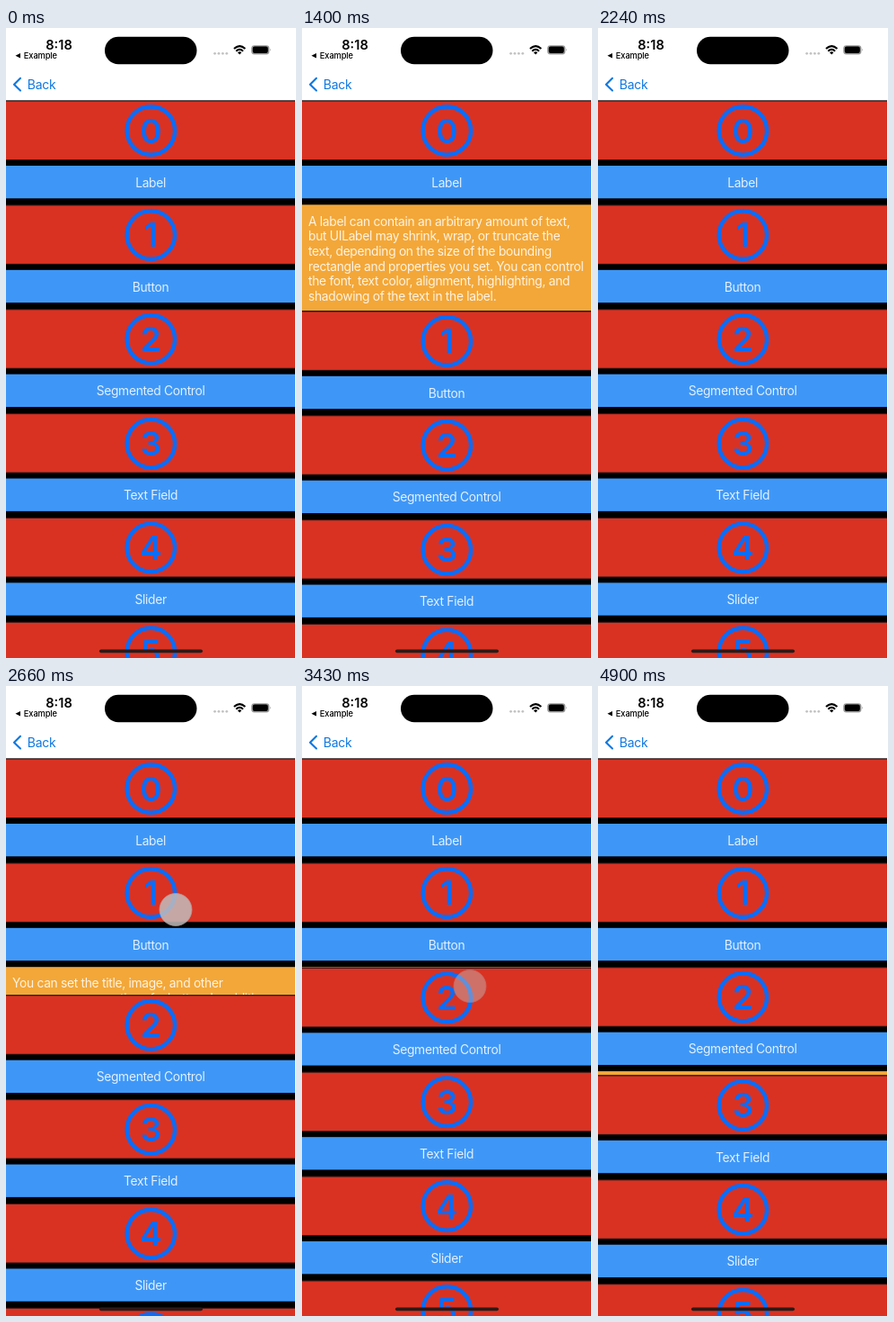
An HTML page that plays this animation: 323 px wide and 700 px high, repeating every 4960 ms.

```html
<!DOCTYPE html>
<html lang="en">
<head>
<meta charset="utf-8">
<title>Accordion list</title>
<style>
  html, body { margin: 0; width: 100%; height: 100%; overflow: hidden; background: #fff; }
  svg { display: block; width: 323px; height: 700px; }
  text { font-family: Inter, "Open Sans", sans-serif; font-size: 13.8px; letter-spacing: -0.3px; }
  .mid { text-anchor: middle; }
  .row { fill: #e4f0fe; }
  .note { fill: #fef3e2; }
  .digit { font-size: 37px; font-weight: 600; letter-spacing: 0; fill: #0b6cf8; }
</style>
</head>
<body>
<svg id="stage" viewBox="0 0 323 700" xmlns="http://www.w3.org/2000/svg">
  <rect width="322" height="700" fill="#000"/>
  <g id="list"></g>
  <circle id="touch" r="18" fill="#c2bcbc" stroke="#b5aaaa" stroke-width="0.8"/>
  <rect x="104" y="690.5" width="115" height="3.7" rx="1.85" fill="#2c1a18"/>

  <rect width="323" height="80.3" fill="#fff"/>
  <text class="mid" x="59" y="23.6" style="font-size:14.6px;font-weight:600;letter-spacing:0">8:18</text>
  <path d="M10.5 30.7 L16 28 V33.4 Z"/>
  <text x="19.8" y="34" style="font-size:9.3px;font-weight:500;letter-spacing:-0.1px">Example</text>
  <rect x="110" y="9.8" width="102.5" height="30.4" rx="15.2"/>
  <g id="dots" fill="#c2c2c2"></g>
  <g fill="none" stroke="#000" stroke-width="2.1">
    <path d="M254 23 Q260.2 17.3 266.4 23"/>
    <path d="M256.3 25.7 Q260.2 22.2 264.1 25.7"/>
  </g>
  <path d="M258 27.2 Q260.2 25.4 262.4 27.2 L260.2 29.5 Z"/>
  <rect x="273.2" y="19.2" width="20.2" height="10.2" rx="3.4" fill="#999"/>
  <rect x="274.8" y="20.6" width="17" height="7.4" rx="2.2"/>
  <path d="M294.2 22.8 Q296 24.3 294.2 25.8 Z" fill="#aaa"/>
  <path d="M16 55.8 L9 62.7 L16 69.6" fill="none" stroke="#0f78e2" stroke-width="2.1" stroke-linecap="round" stroke-linejoin="round"/>
  <text x="23.8" y="67.6" fill="#0f78e2" style="font-size:14px">Back</text>
</svg>
<script>
const LOOP = 4960, STEP = 70, SLIDE = 400;
const WIDTH = 322, TOP = 80.5, PITCH = 115.85, LINE = 16.67, PAD = 18;

const items = [
  { title: 'Label', open: 776, close: 1666, note: [
    'A label can contain an arbitrary amount of text,',
    'but UILabel may shrink, wrap, or truncate the',
    'text, depending on the size of the bounding',
    'rectangle and properties you set. You can control',
    'the font, text color, alignment, highlighting, and',
    'shadowing of the text in the label.'] },
  { title: 'Button', open: 2496, close: 3050, note: [
    'You can set the title, image, and other',
    'appearance properties of a button. In addition,',
    'you can specify a different appearance for each',
    'button state.'] },
  { title: 'Segmented Control', open: 3690, close: 4550, note: [
    'The segments can represent single or multiple',
    'selection, or a list of commands.',
    '',
    'Each segment can display text or an image, but',
    'not both.'] },
  { title: 'Text Field' },
  { title: 'Slider' },
  { title: 'Switch' }
];

const taps = [
  { from: 600, to: 1200, x: 183.5, y: 135.5 },
  { from: 1400, to: 2000, x: 183.5, y: 135.5 },
  { from: 2260, to: 2790, x: 189, y: 248.5 },
  { from: 2830, to: 3240, x: 189, y: 248.5 },
  { from: 3360, to: 3950, x: 187, y: 333.5 },
  { from: 4230, to: 4790, x: 187, y: 337 }
];

const byId = id => document.getElementById(id);
const list = byId('list'), touch = byId('touch');

function add(parent, tag, attrs, content) {
  const el = document.createElementNS('http://www.w3.org/2000/svg', tag);
  for (const k in attrs) el.setAttribute(k, attrs[k]);
  if (content) el.textContent = content;
  return parent.appendChild(el);
}

const bar = (g, y, height, fill) => add(g, 'rect', { y, width: WIDTH, height, fill });

// Each section is opaque, so it hides whatever part of the note above is folded.
items.forEach((item, i) => {
  const g = item.node = add(list, 'g', {});
  bar(g, 0, PITCH + 0.3, '#000');
  bar(g, 0, 66.4, '#351916');
  bar(g, 1.1, 64.4, '#d93223');
  bar(g, 72.5, 36.3, '#3e97f7');
  add(g, 'circle', { cx: 161.4, cy: 33.6, r: 26.7, fill: 'none', stroke: '#0b6cf8', 'stroke-width': 4.6 });
  add(g, 'text', { class: 'digit mid', x: 161.4, y: 47 }, String(i));
  add(g, 'text', { class: 'row mid', x: 161.1, y: 96.2 }, item.title);
  item.height = 0;
  if (!item.note) return;
  item.height = item.note.length * LINE + PAD;
  item.fold = add(g, 'g', { transform: `translate(0 ${PITCH})` });
  bar(item.fold, 0, item.height, '#f3a738');
  item.note.forEach((s, n) =>
    add(item.fold, 'text', { class: 'note', x: 7, y: 23.2 + n * LINE }, s));
});

for (let i = 0; i < 4; i++) add(byId('dots'), 'circle', { cx: 232.6 + i * 4.4, cy: 28.3, r: 1.4 });

const clamp = v => Math.min(1, Math.max(0, v));
const ease = v => v * v * (3 - 2 * v);
const slide = (t, start) => ease(clamp((t - start) / SLIDE));

function draw(t) {
  let y = TOP;
  for (const item of items) {
    item.node.setAttribute('transform', `translate(0 ${y.toFixed(2)})`);
    y += PITCH;
    if (!item.fold) continue;
    const shown = slide(t, item.open) - slide(t, item.close);
    item.fold.setAttribute('visibility', shown > 0 ? 'visible' : 'hidden');
    y += item.height * shown;
  }
  const tap = taps.find(p => t >= p.from && t < p.to);
  touch.setAttribute('visibility', tap ? 'visible' : 'hidden');
  if (!tap) return;
  touch.setAttribute('cx', tap.x);
  touch.setAttribute('cy', tap.y);
  const fade = Math.min(clamp((t - tap.from) / 130), clamp((tap.to - t) / 100));
  touch.setAttribute('opacity', (0.85 * fade).toFixed(3));
}

const begin = performance.now();
function tick() {
  const t = (performance.now() - begin) % LOOP;
  draw(Math.floor(t / STEP) * STEP);
  requestAnimationFrame(tick);
}
draw(0);
requestAnimationFrame(tick);
</script>
</body>
</html>
```
